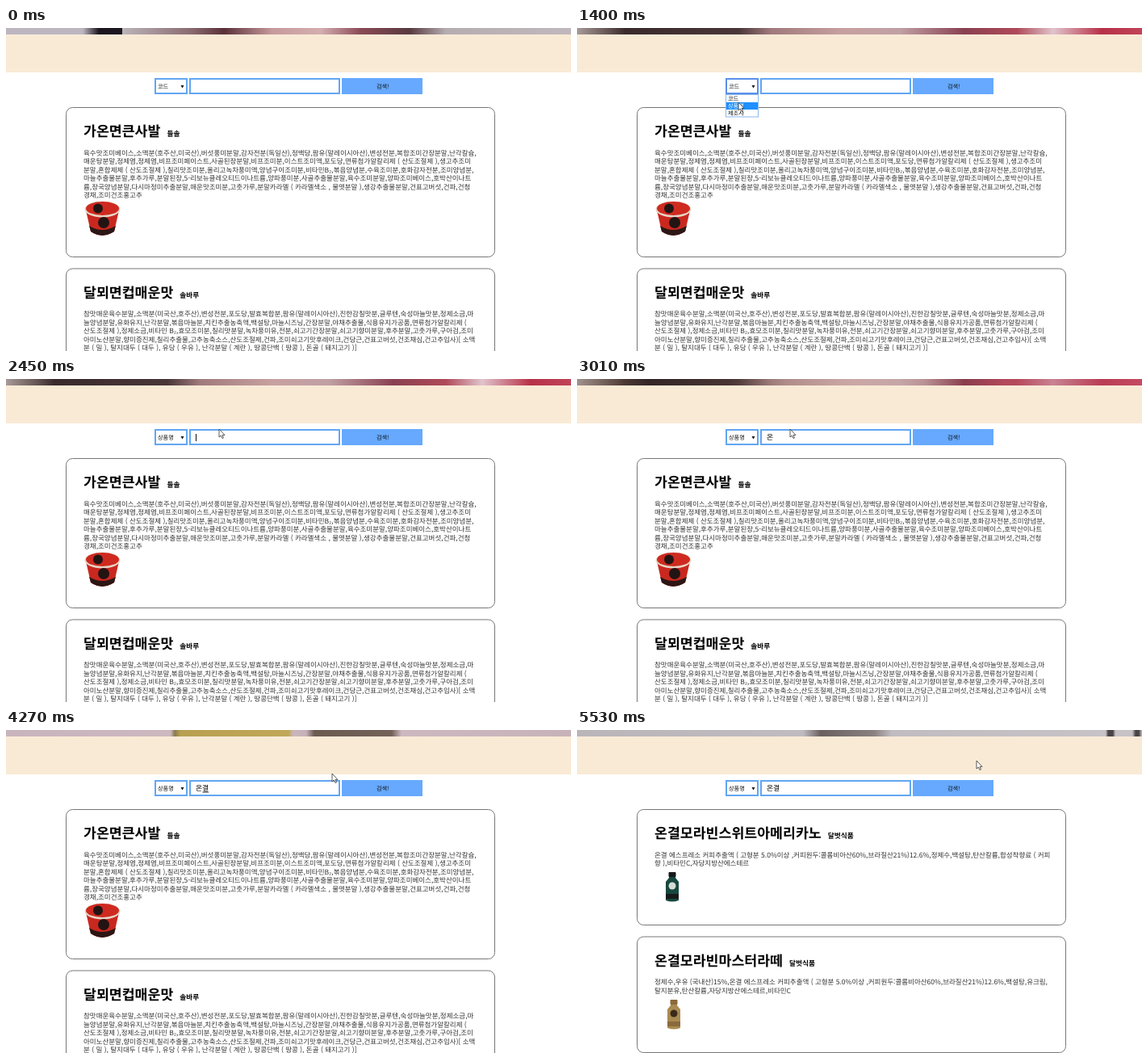
An HTML page that plays this animation: 700 px wide and 400 px high, repeating every 5600 ms.

```html
<!DOCTYPE html>
<html lang="ko">
<head>
<meta charset="utf-8">
<style>
  html, body { margin: 0; width: 100%; height: 100%; overflow: hidden; background: #fff; }
  #stage { position: relative; width: 700px; height: 400px; overflow: hidden; }
  #hero div { position: absolute; width: 700px; height: 8px; }
  svg { position: absolute; left: 0; top: 0; }
  text {
    font-family: "Noto Sans CJK KR", "Noto Sans CJK JP", "Noto Sans CJK", sans-serif;
    text-rendering: geometricPrecision; white-space: pre; fill: #333;
  }
  .title { font-size: 17.3px; font-weight: 700; fill: #000; }
  .maker { font-size: 8.7px; }
  .body { font-size: 8.5px; }
  .small { font-size: 7.2px; fill: #111; }
  .typed { font-size: 8.8px; font-weight: 500; fill: #000; }
  .card { fill: #fff; stroke: #777; }
  .field { fill: #fff; stroke: #62a6f2; stroke-width: 2; }
</style>
</head>
<body>
<div id="stage">
  <div id="hero"></div>
  <svg width="700" height="400">
    <rect y="8" width="700" height="47" fill="#f9ead6"/>
    <g id="before"></g>
    <g id="after"></g>

    <rect id="select" class="field" x="185" y="63" width="39" height="18"/>
    <text id="choice" class="small" x="188" y="75"></text>
    <path d="M216.5 71h4l-2 3.4z" fill="#111"/>
    <rect class="field" x="228" y="63" width="185" height="18"/>
    <text id="typed" class="typed" x="235" y="75.3"></text>
    <path id="underline" d="M243.5 77h7.5" stroke="#222"/>
    <path id="caret" d="M235.5 68v9" stroke="#111"/>
    <rect x="416" y="62" width="100" height="20" fill="#66a9ff"/>
    <text class="small" x="459" y="75">검색!</text>

    <g id="menu">
      <rect x="184.5" y="82.5" width="40" height="27.5" fill="#fff" stroke="#8ab8ee"/>
      <rect x="185" y="92" width="39" height="9" fill="#1e90ff"/>
      <text class="small" x="187" y="90">코드</text>
      <text class="small" x="187" y="99.2" style="fill:#fff">상품명</text>
      <text class="small" x="187" y="108">제조사</text>
    </g>
    <path id="cursor" d="M0 0V10L2.3 8 4 11.5 5.5 10.8 4 7.4H7z" fill="#fff" stroke="#333" stroke-width=".8"/>
  </svg>
</div>
<script>
const $ = id => document.getElementById(id);
const show = (id, on) => $(id).style.display = on ? "" : "none";

// Product pictures, drawn around their top left corner
const cup = `
  <path d="M2 12L8 38Q22 48 37 38L43 12z" fill="#c9281f"/>
  <path d="M6 31L8 38Q22 48 37 38L39 31Q22 41 6 31z" fill="#2b1715"/>
  <ellipse cx="22.5" cy="10.5" rx="22" ry="10" fill="#e6d5c4"/>
  <ellipse cx="22.5" cy="9.5" rx="20.5" ry="8.5" fill="#cf2a20"/>
  <circle cx="17" cy="9.5" r="6" fill="#231414"/>
  <circle cx="24" cy="27" r="7" fill="#231414"/>`;
const bottle = (cap, body, label) => `
  <path d="M5 0h8v7l4 5v23q-8 3-16 0V12l4-5z" fill="${body}"/>
  <rect x="4.5" width="9" height="6" rx="1" fill="${cap}"/>
  <circle cx="9" cy="17" r="4.5" fill="${label}"/>
  <path d="M1 27h16v6H1z" fill="${cap}"/>`;

function card(y, height, name, maker, lines, picture, px, py) {
  const body = lines.map((s, i) =>
    `<text class="body" x="96" y="${y + 59.7 + i * 10.5}">${s}</text>`).join("");
  return `<rect class="card" x="74.5" y="${y + .5}" width="531" height="${height}" rx="8"/>
    <text class="title" x="96" y="${y + 36}">${name}<tspan class="maker" dx="8">${maker}</tspan></text>
    ${body}<g transform="translate(${px} ${py})">${picture}</g>`;
}

$("before").innerHTML =
  card(98, 185, "가온면큰사발", "들솔", [
    "육수맛조미베이스,소맥분(호주산,미국산),버섯풍미분말,감자전분(독일산),정백당,팜유(말레이시아산),변성전분,복합조미간장분말,난각칼슘,",
    "매운탕분말,정제염,정제염,비프조미페이스트,사골된장분말,비프조미분,이스트조미액,포도당,면류첨가알칼리제 ( 산도조절제 ),생고추조미",
    "분말,혼합제제 ( 산도조절제 ),칠리맛조미분,올리고녹차풍미액,양념구이조미분,비타민B₂,볶음양념분,수육조미분,호화감자전분,조미양념분,",
    "마늘추출물분말,후추가루,분말된장,5-리보뉴클레오티드이나트륨,양파풍미분,사골추출물분말,육수조미분말,양파조미베이스,호박산이나트",
    "륨,장국양념분말,다시마정미추출분말,매운맛조미분,고춧가루,분말카라멜 ( 카라멜색소 , 물엿분말 ),생강추출물분말,건표고버섯,건파,건청",
    "경채,조미건조홍고추"
  ], cup, 97, 214) +
  card(297.5, 185, "달뫼면컵매운맛", "솔바루", [
    "참맛매운육수분말,소맥분(미국산,호주산),변성전분,포도당,발효복합분,팜유(말레이시아산),진한감칠맛분,글루텐,숙성마늘맛분,정제소금,마",
    "늘양념분말,유화유지,난각분말,볶음마늘분,치킨추출농축액,백설탕,마늘시즈닝,간장분말,야채추출물,식용유지가공품,면류첨가알칼리제 (",
    "산도조절제 ),정제소금,비타민 B₂,효모조미분,칠리맛분말,녹차풍미유,전분,쇠고기간장분말,쇠고기향미분말,후추분말,고춧가루,구아검,조미",
    "아미노산분말,향미증진제,칠리추출물,고추농축소스,산도조절제,건파,조미쇠고기맛후레이크,건당근,건표고버섯,건조채심,건고추입사)[ 소맥",
    "분 ( 밀 ), 탈지대두 ( 대두 ), 유당 ( 우유 ), 난각분말 ( 계란 ), 땅콩단백 ( 땅콩 ), 돈골 ( 돼지고기 )]"
  ], "", 0, 0);

const coffee = "온결 에스프레소 커피추출액 ( 고형분 5.0%이상 ,커피원두:콜롬비아산60%,브라질산21%)12.6%,";
$("after").innerHTML =
  card(98, 143, "온결모라빈스위트아메리카노", "달벗식품", [
    coffee + "정제수,백설탕,탄산칼륨,합성착향료 ( 커피",
    "향 ),비타민C,자당지방산에스테르"
  ], bottle("#17191a", "#17483f", "#d5dbd6"), 109, 176) +
  card(255.5, 143.5, "온결모라빈마스터라떼", "달벗식품", [
    "정제수,우유 (국내산)15%," + coffee + "백설탕,유크림,",
    "탈지분유,탄산칼륨,자당지방산에스테르,비타민C"
  ], bottle("#8a6a3c", "#a98b52", "#3a2a1c"), 111, 334);

// Photo strip: [fade start, fade end, gradient]; each layer covers the ones before it
const strip = [
  [-1, 0, "#bdb5c0 95px,#1c1620 115px 144px,#bbb4b9 144px,#8a6a70 230px,#5a3038 270px,#c79a9c 330px,#d4aeb0 390px,#8a4a55 440px,#583a40 500px,#b5adb0 545px,#c0b8bc"],
  [699, 700, "#b98a94,#a8808a 40px,#5a3a40 70px,#3a2a2c 190px,#8a5a60 240px,#c79aa0 350px,#8a4050 440px,#d0b0b8 500px,#b04a5a 560px,#e0c8d0 620px,#b83a4e"],
  [910, 1400, "#a79a98,#6a5a58 35px,#3a2a2c 60px,#4a3638 200px,#a07a7c 240px,#c8a0a0 330px,#c0a0a4 400px,#8a4050 480px,#b04a5a 545px,#e0c4cc 590px,#b83048 650px,#c04458"],
  [2450, 3570, "#9a8a84,#6a5048 50px,#2a1e1e 90px,#4a3430 190px,#b89890 260px,#d0b0ac 350px,#c8a8a8 430px,#8a3a4a 480px,#c04a60 530px,#b04058 600px,#c8506a"],
  [4059, 4060, "#c8b4bc,#cdb8c0 204px,#8a7a50 209px,#b8a050 216px,#c0a858 350px,#cbb6be 356px,#c6b0b8 372px,#6a5a50 382px,#74625a 478px,#cdb8c0 490px,#c8b2ba"],
  [5249, 5250, "#b9b5b9,#bfbbbf 280px,#6a6060 302px,#8a8080 368px,#c0bcc0 390px,#c6c2c6 655px,#4a4446 658px 664px,#c6c2c6 667px 688px,#4a4446 692px 696px,#c6c2c6"]
];
const layers = strip.map(([, , stops]) => {
  const layer = $("hero").appendChild(document.createElement("div"));
  layer.style.background = `linear-gradient(90deg,${stops})`;
  return layer;
});

// Pointer stops: time, x, y
const path = [
  [350, 330, 4], [630, 240, 52], [840, 204, 66], [1120, 204, 66], [1330, 200, 92],
  [1680, 200, 92], [1890, 202, 74], [2240, 264, 62], [3850, 264, 62], [4270, 404, 54],
  [4480, 455, 69], [5110, 458, 70], [5530, 495, 38]
];
const typing = [[2660, "ㅇ"], [2800, "오"], [2940, "온"], [3150, "온ㄱ"], [3360, "온겨"], [3500, "온결"]];

const ramp = (t, a, b) => Math.min(1, Math.max(0, (t - a) / (b - a)));

function pointer(t) {
  const i = Math.max(1, path.findIndex(p => p[0] >= t));
  const [a, b] = [path[i - 1], path[i]];
  const k = ramp(t, a[0], b[0]), e = k * k * (3 - 2 * k);
  return [1, 2].map(n => a[n] + (b[n] - a[n]) * e);
}

function draw(t) {
  layers.forEach((layer, i) => layer.style.opacity = ramp(t, strip[i][0], strip[i][1]));
  const open = t >= 1120 && t < 1680, found = t >= 4830;
  const word = typing.filter(([at]) => t >= at).map(p => p[1]).pop() || "";
  show("before", !found);
  show("after", found);
  show("menu", open);
  $("select").style.stroke = open ? "#5b8fea" : "";
  $("choice").textContent = t < 1680 ? "코드" : "상품명";
  $("typed").textContent = word;
  show("underline", word.length > 1 && !found);
  show("caret", t >= 2240 && t < 2660);
  show("cursor", t >= 350);
  $("cursor").setAttribute("transform", `translate(${pointer(t)})`);
}

function loop(now) {
  draw(Math.floor(now % 5600 / 70) * 70);
  requestAnimationFrame(loop);
}
loop(performance.now());
</script>
</body>
</html>
```
